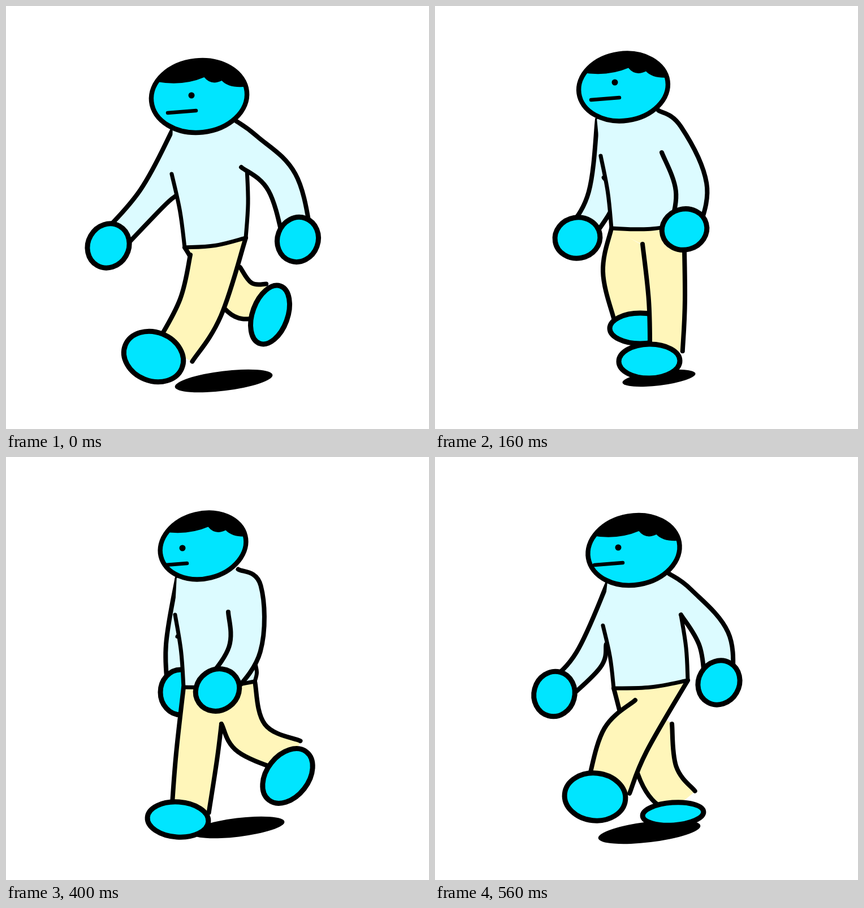
Write an HTML page with a canvas that moves like this. It is 748 px wide and 748 px high and loops after 0.64 s.

```html
<!DOCTYPE html>
<html lang="en">
<head>
<meta charset="utf-8">
<title>Walk cycle</title>
<style>
  html, body { margin: 0; width: 100%; height: 100%; overflow: hidden; background: #fff; }
  canvas { display: block; width: 748px; height: 748px; }
</style>
</head>
<body>
<canvas id="stage" width="748" height="748"></canvas>
<script>
const ctx = document.getElementById("stage").getContext("2d");
const SKIN = "#00e5ff", SHIRT = "#dcfbff", PANTS = "#fff6ba", INK = "#000";
const STEP = 80;
// Key pose shown at each step; halves lie midway between two poses.
const CYCLE = [0, 0.5, 1, 1.5, 2, 3, 4, 5];

// head: x y scale tilt; eye: x y; shadow: x y radius
// torso: front armpit, front hem, back hem, back armpit
// arms: elbow (near: armpit, elbow); hands: x y tilt
// legs: inner top, knee, ankle, width; feet: x y tilt thickness
const poses = [
  { head: [341.5, 160, 1.06, -6], eye: [328, 158], shadow: [385, 663, 87],
    torso: [293, 297, 316, 427, 424, 410, 426, 288],
    farArm: [257, 341], farHand: [181, 424, -60], nearArm: [416, 285, 488, 312], nearHand: [516, 413, -70],
    farLeg: [414, 462, 413, 515, 456, 521, 66], farFoot: [467, 546, -70, 31],
    nearLeg: [326, 440, 344, 533, 299, 611, 78], nearFoot: [261, 620, 22, 43] },
  { head: [333, 143.5, 0.99, -8], eye: [318, 135], shadow: [396, 658, 65],
    torso: [293, 265, 312, 393, 440, 386, 450, 300],
    farArm: [296, 335], farHand: [252, 410, -10], nearArm: [401, 259, 453, 320], nearHand: [441, 395, -15],
    farLeg: [395, 440, 337, 470, 352, 548, 80], farFoot: [363, 570, 0, 27],
    nearLeg: [367, 421, 410, 520, 409, 610, 64], nearFoot: [379, 628, -1, 30] },
  { head: [347.5, 168, 0.99, -4], eye: [321, 165], shadow: [364, 664, 119],
    torso: [306, 280, 313, 396, 435, 400, 440, 310],
    farArm: [312, 300], farHand: [358, 340, -10], nearArm: [401, 277, 427, 360], nearHand: [349, 415, -8],
    farLeg: [362, 475, 286, 500, 250, 587, 56], farFoot: [224, 605, 10, 34],
    nearLeg: [362, 475, 422, 511, 484, 568, 70], nearFoot: [511, 595, -80, 35] },
  { head: [348.5, 157.5, 0.96, -14], eye: [312, 161], shadow: [410, 655, 83],
    torso: [299, 279, 314, 407, 440, 397, 441, 366],
    farArm: [308, 330], farHand: [309, 416, -90], nearArm: [393, 274, 422, 340], nearHand: [374, 412, -35],
    farLeg: [381, 472, 337, 530, 326, 625, 73], farFoot: [304, 641, 4, 31],
    nearLeg: [381, 472, 434, 497, 508, 530, 68], nearFoot: [498, 564, -52, 37] },
  { head: [358, 163, 0.96, -4], eye: [329, 153], shadow: [400, 667, 80],
    torso: [313, 286, 318, 406, 470, 403, 480, 310],
    farArm: [280, 355], farHand: [256, 425, 5], nearArm: [416, 281, 485, 328], nearHand: [473, 404, -15],
    farLeg: [355, 429, 358, 520, 370, 600, 70], farFoot: [349, 641, -6, 31],
    nearLeg: [355, 429, 392, 490, 430, 570, 85], nearFoot: [423, 600, -34, 40] },
  { head: [351.5, 165, 1.02, -10], eye: [324, 160], shadow: [379, 663, 91],
    torso: [297, 298, 316, 409, 447, 395, 435, 280],
    farArm: [271, 359], farHand: [211, 419, -75], nearArm: [435, 279, 493, 322], nearHand: [502, 399, -60],
    farLeg: [419, 472, 395, 560, 436, 610, 68], farFoot: [421, 631, -4, 20],
    nearLeg: [354, 430, 337, 500, 308, 582, 85], nearFoot: [283, 601, 6, 42] }
];

function poseAt(phase) {
  const from = poses[Math.floor(phase)], to = poses[Math.ceil(phase)], pose = {};
  for (const part in from)
    pose[part] = from[part].map((v, i) => v + (to[part][i] - v) * (phase % 1));
  return pose;
}

const mix = (a, b, k) => [a[0] + (b[0] - a[0]) * k, a[1] + (b[1] - a[1]) * k];
const shift = (p, x, y) => [p[0] + x, p[1] + y];
const bend = (a, b, x, y) => [a, shift(mix(a, b, 0.5), x, y), b];
const toPoints = values =>
  Array.from({ length: values.length >> 1 }, (_, i) => [values[2 * i], values[2 * i + 1]]);

// Appends a smooth curve through the points to a path.
function curve(path, pts) {
  const TENSION = 5.2, last = pts.length - 1;
  path.lineTo(...pts[0]);
  for (let i = 0; i < last; i++) {
    const a = pts[Math.max(0, i - 1)], b = pts[i], c = pts[i + 1], d = pts[Math.min(last, i + 2)];
    path.bezierCurveTo(
      b[0] + (c[0] - a[0]) / TENSION, b[1] + (c[1] - a[1]) / TENSION,
      c[0] - (d[0] - b[0]) / TENSION, c[1] - (d[1] - b[1]) / TENSION, ...c);
  }
  return path;
}

function ellipse(x, y, rx, ry, tilt) {
  const path = new Path2D();
  path.ellipse(x, y, rx, ry, tilt * Math.PI / 180, 0, 2 * Math.PI);
  return path;
}

function fill(path, color) {
  ctx.fillStyle = color;
  ctx.fill(path);
}

function stroke(path, width = 8, color = INK) {
  ctx.lineWidth = width;
  ctx.strokeStyle = color;
  ctx.stroke(path);
}

const line = (pts, width) => stroke(curve(new Path2D(), pts), width);

// Fills the area enclosed by a chain of curves, slightly spread to hide seams.
function fillBetween(color, ...edges) {
  const path = new Path2D();
  edges.forEach(pts => curve(path, pts));
  path.closePath();
  fill(path, color);
  stroke(path, 1.5, color);
}

function blob(...shape) {
  const path = ellipse(...shape);
  fill(path, SKIN);
  stroke(path, 9);
}

const hand = ([x, y, tilt]) => blob(x, y, 40, 36, tilt);
const foot = ([x, y, tilt, thickness]) => blob(x, y, 54, thickness, tilt);

// A tube from two upper edges through a joint to its end.
function limb(color, width, leftTop, rightTop, joint, end) {
  const top = mix(leftTop[0], rightTop[0], 0.5);
  const side = (p, from, w) => {
    const dx = end[0] - from[0], dy = end[1] - from[1], k = w / 2 / Math.hypot(dx, dy);
    return shift(p, -dy * k, dx * k);
  };
  const edge = (start, w) => [...start, side(joint, top, w), side(end, joint, w * 0.9)];
  const left = edge(leftTop, width), right = edge(rightTop, -width);
  fillBetween(color, left, right.slice().reverse());
  line(left);
  line(right);
}

function drawPose(pose) {
  const { head, farHand, nearHand, shadow } = pose;
  const [frontPit, frontHem, backHem, backPit] = toPoints(pose.torso);
  const [farTop, farKnee, farAnkle] = toPoints(pose.farLeg);
  const [crotch, nearKnee, nearAnkle] = toPoints(pose.nearLeg);
  const [nearPit, nearElbow] = toPoints(pose.nearArm);
  const farShoulder = shift(head, -46, 57), nearShoulder = shift(head, 62, 41);
  const front = bend(frontPit, frontHem, 3, 0);
  const hem = bend(frontHem, backHem, 0, 5);
  const back = bend(backHem, backPit, 3, 0);

  ctx.fillStyle = "#fff";
  ctx.fillRect(0, 0, 748, 748);
  fill(ellipse(shadow[0], shadow[1], shadow[2], shadow[2] * 0.2, -7), INK);

  limb(SHIRT, 50, [farShoulder], [mix(frontPit, frontHem, 0.3)], pose.farArm, farHand);
  hand(farHand);

  fillBetween(PANTS, [frontHem], [backHem], [crotch]);
  limb(PANTS, pose.farLeg[6], [frontHem], [farTop], farKnee, farAnkle);
  foot(pose.farFoot);
  limb(PANTS, pose.nearLeg[6], [crotch], [backHem], nearKnee, nearAnkle);
  foot(pose.nearFoot);

  fillBetween(SHIRT, [farShoulder], front, hem, back, [nearShoulder]);
  [front, hem, back].forEach(pts => line(pts, 7));

  limb(SHIRT, 56, [nearPit], [nearShoulder, shift(head, 102, 70)], nearElbow, nearHand);
  hand(nearHand);
  drawHead(head, pose.eye);
}

function drawHead([x, y, scale, tilt], eye) {
  const skull = ellipse(x, y, 80 * scale, 60 * scale, tilt);
  const hair = new Path2D();
  hair.moveTo(x - 75, y - 26);
  hair.quadraticCurveTo(x - 28, y - 18, x + 9, y - 34);
  hair.quadraticCurveTo(x + 21, y - 19, x + 40, y - 28);
  hair.quadraticCurveTo(x + 54, y - 13, x + 88, y - 18);
  hair.lineTo(x + 88, y - 80);
  hair.lineTo(x - 75, y - 80);

  fill(skull, SKIN);
  ctx.save();
  ctx.clip(skull);
  fill(hair, INK);
  line([shift(eye, -42, 31), shift(eye, 8, 27)], 6.5);
  ctx.restore();
  stroke(skull, 8.5);
  fill(ellipse(...eye, 5.5, 5.5, 0), INK);
}

ctx.lineCap = ctx.lineJoin = "round";

function tick() {
  const step = Math.floor(performance.now() / STEP) % CYCLE.length;
  drawPose(poseAt(CYCLE[step]));
  requestAnimationFrame(tick);
}
tick();
</script>
</body>
</html>
```
